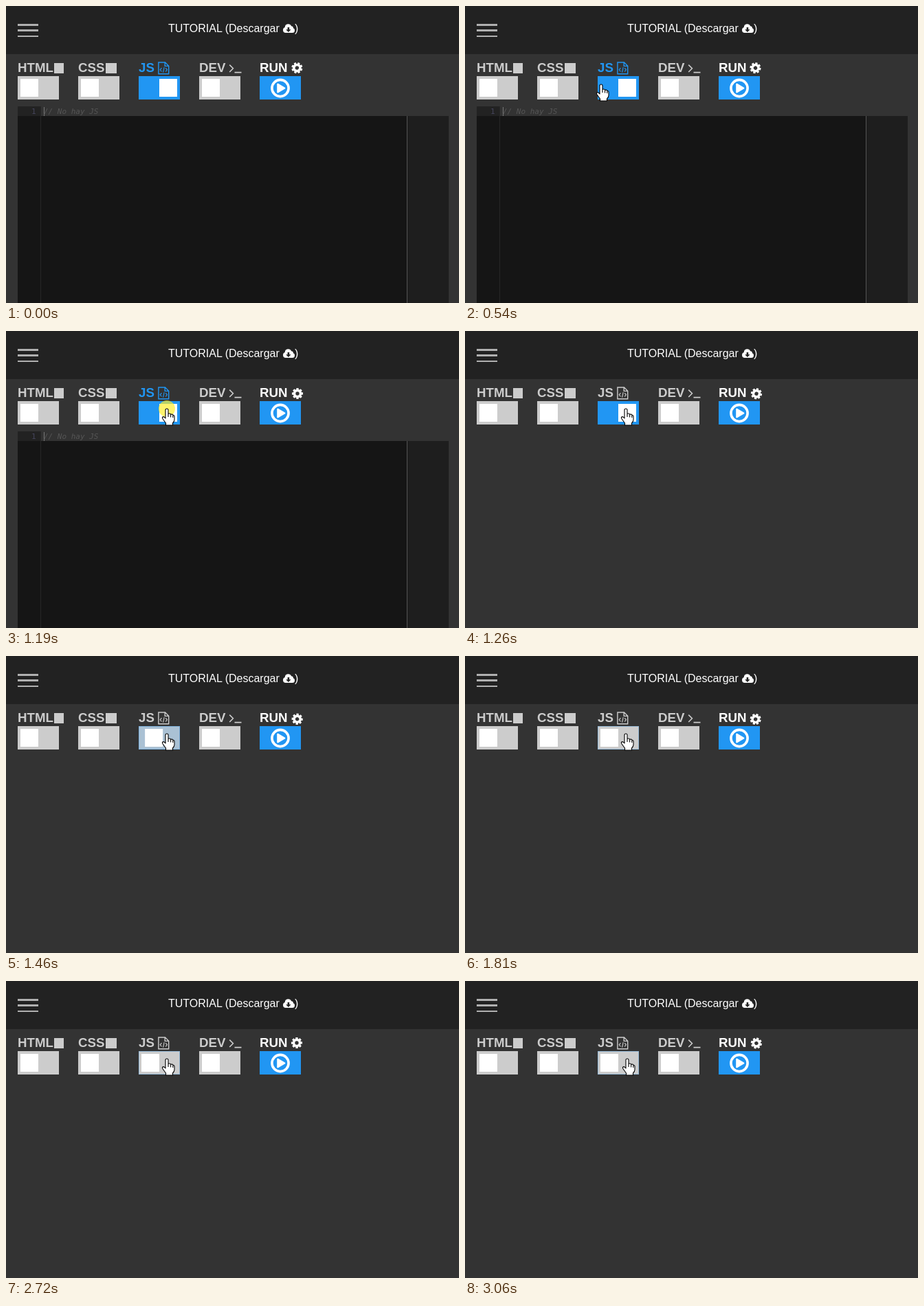
An HTML page with a canvas that plays this animation: 659x432 px, repeating every 3130 ms.

```html
<!DOCTYPE html>
<html lang="es">
<head>
<meta charset="utf-8">
<title>Editor</title>
<style>
html, body { margin: 0; width: 100%; height: 100%; overflow: hidden; background: #333; }
canvas { position: absolute; left: 0; top: 0; }
span { position: absolute; line-height: 1; white-space: pre; font-family: "Liberation Sans", Arial, sans-serif; }
.title { top: 25px; font-size: 16px; color: #fff; }
.label { top: 81px; font-size: 18.72px; font-weight: bold; color: #ccc; }
.code { top: 148px; font: italic 11px/11px "DejaVu Sans Mono", monospace; color: #555; }
</style>
</head>
<body>
<canvas id="stage" width="659" height="432"></canvas>
<span class="title" style="left:236px">TUTORIAL (Descargar</span>
<span class="title" style="left:420px">)</span>
<span class="label" style="left:17px">HTML</span>
<span class="label" style="left:105px">CSS</span>
<span class="label" id="js" style="left:193px">JS</span>
<span class="label" style="left:281px">DEV</span>
<span class="label" style="left:369px; color:#fff">RUN</span>
<div id="editor">
<span class="code" style="left:37px; font-style:normal; color:#45455c">1</span>
<span class="code" style="left:55px">// No hay JS</span>
</div>
<script>
const ctx = document.getElementById('stage').getContext('2d');
const jsLabel = document.getElementById('js');
const editor = document.getElementById('editor');
const LOOP = 3130, CLICK = 1260, BLUE = '#2196f3', GREY = '#cccccc';

// [time, step] pairs: the picture advances in steps of about 68 ms
const STEPS = [[0, 0], [540, 8], [1060, 16], [1600, 24], [2180, 32], [2720, 40], [3130, 46]];
// [step, x] of the pointer's fingertip
const PATH = [[6, 150], [7, 175], [8, 198], [10, 208], [13, 228], [15, 234], [42, 234], [44, 236]];

function along(points, p) {
  let i = 1;
  while (i < points.length - 1 && p > points[i][0]) i++;
  const [a, va] = points[i - 1], [b, vb] = points[i];
  return va + (vb - va) * Math.min(1, Math.max(0, (p - a) / (b - a)));
}

// cubic-bezier(.25, .1, .25, 1)
function ease(x) {
  if (x <= 0) return 0;
  if (x >= 1) return 1;
  const bez = (s, a, b) => 3 * s * (1 - s) * (1 - s) * a + 3 * s * s * (1 - s) * b + s * s * s;
  let lo = 0, hi = 1;
  for (let i = 0; i < 20; i++) {
    const mid = (lo + hi) / 2;
    if (bez(mid, .25, .25) < x) lo = mid; else hi = mid;
  }
  return bez(lo, .1, 1);
}

function mix(a, b, k) {
  const part = (c, i) => parseInt(c.slice(i, i + 2), 16);
  return 'rgb(' + [1, 3, 5].map(i => Math.round(part(a, i) + (part(b, i) - part(a, i)) * k)) + ')';
}

function rect(color, x, y, w, h) {
  ctx.fillStyle = color;
  ctx.fillRect(x, y, w, h);
}

function disc(color, x, y, r) {
  ctx.fillStyle = color;
  ctx.beginPath();
  ctx.arc(x, y, r, 0, 7);
  ctx.fill();
}

function line(color, width, d) {
  ctx.strokeStyle = color;
  ctx.lineWidth = width;
  ctx.stroke(new Path2D(d));
}

function shape(color, d) {
  ctx.fillStyle = color;
  ctx.fill(new Path2D(d));
}

function toggle(x, off) {
  rect(mix(BLUE, GREY, off), x, 102, 60, 34);
  rect('#fff', x + 30 - 26 * off, 106, 26, 26);
}

function header() {
  rect('#222', 0, 0, 659, 70);
  for (const y of [26, 34, 43]) rect('#b0b0b0', 17, y, 30, 3 - (y > 40));
  disc('#fff', 407, 35, 4);
  disc('#fff', 410.5, 31, 4.8);
  disc('#fff', 415, 32, 2.8);
  disc('#fff', 416.5, 35.6, 3.5);
  rect('#fff', 407, 33, 9.5, 6);
  shape('#222', 'M409.6 31h2.6v3.2h2.4l-3.7 3.8l-3.7-3.8h2.4z');
}

function icons(fileColor) {
  rect(GREY, 70, 83, 14, 15);
  rect(GREY, 145, 83, 16, 15);
  line(fileColor, 1.4, 'M221.9 82h9.6l5.2 5.2v11.6h-14.8zM231.2 82v5.4h5.4');
  line(fileColor, 1.1, 'M226.4 90.2l-2.2 2.6l2.2 2.6M232.2 90.2l2.2 2.6l-2.2 2.6M230.2 89.2l-1.6 7.4');
  line(GREY, 1.6, 'M325.2 85.6l5.2 5.2l-5.2 5.2M332.5 96.6h10');
}

function runButton() {
  rect(BLUE, 369, 102, 60, 34);
  ctx.strokeStyle = '#fff';
  ctx.lineWidth = 3.6;
  ctx.beginPath();
  ctx.arc(399, 119.5, 12.1, 0, 7);
  ctx.stroke();
  ctx.lineJoin = 'round';
  line('#fff', 2.4, 'M395.4 113.8v11.4l9.8-5.7z');
  shape('#fff', 'M395.4 113.8v11.4l9.8-5.7z');
  ctx.lineJoin = 'miter';
}

// the wheel sits one pixel off its pivot, so it wobbles as it spins
function gear(angle) {
  ctx.save();
  ctx.translate(423, 91);
  ctx.rotate(angle);
  ctx.translate(1, 0);
  ctx.beginPath();
  for (let i = 0; i < 8; i++) {
    const a = i * Math.PI / 4;
    for (const [r, da] of [[6.2, -.27], [8.2, -.2], [8.2, .2], [6.2, .27]])
      ctx.lineTo(r * Math.cos(a + da), r * Math.sin(a + da));
  }
  ctx.closePath();
  ctx.moveTo(2.7, 0);
  ctx.arc(0, 0, 2.7, 0, Math.PI * 2, true);
  ctx.fillStyle = '#fff';
  ctx.fill('evenodd');
  ctx.restore();
}

function editorPane() {
  rect('#151515', 17, 146, 566, 286);
  rect('#1e1e1e', 584, 146, 60, 286);
  rect('#555', 583, 146, 1, 286);
  rect('#333', 51, 146, 593, 14);
  rect('#222', 17, 146, 33, 14);
  rect('#262626', 50, 146, 1, 286);
  rect('#777', 55, 147, 1, 13);
}

function hand(x, y) {
  ctx.save();
  ctx.translate(x, y);
  ctx.lineJoin = 'round';
  const body = 'M-2 14V2Q-2 0 0 0Q2 0 2 2V7.3Q5 6.3 6 8.3Q8.6 7.6 9 9.5Q11 9.2 11 11.5V16'
    + 'Q11 18.5 8.5 21V24H-1.5V21L-6 14.8Q-7.5 11.8 -5 11.6Q-3.8 11.6 -2 14Z';
  shape('#fff', body);
  line('#000', 1.1, body + 'M2 7.3V12M5.6 8.3V12.5M8.8 9.6V13');
  ctx.restore();
}

function draw(t) {
  const step = Math.floor(along(STEPS, Math.min(t + 9, LOOP - 1)));
  const now = step * LOOP / 46;
  const open = step < 19;
  const off = ease((step - 19) / 6);

  rect('#333', 0, 0, 659, 432);
  header();
  icons(open ? BLUE : GREY);
  toggle(17, 1);
  toggle(105, 1);
  toggle(193, off);
  toggle(281, 1);
  if (off > 0) line('rgba(33,150,243,.3)', 1, 'M193.5 102.5h59v33h-59z');
  runButton();
  gear(step ? (now - 1225) / 1000 * Math.PI : -1.2);
  if (open) editorPane();
  if (step === 17 || step === 18) disc('rgba(255,238,40,.68)', 234, 113, 12);
  if (step >= 6) hand(along(PATH, step), step < 10 ? 114 : 113);

  jsLabel.style.color = open ? BLUE : GREY;
  editor.style.visibility = open ? 'visible' : 'hidden';
}

const start = performance.now();
function tick() {
  draw((performance.now() - start) % LOOP);
  requestAnimationFrame(tick);
}
tick();
</script>
</body>
</html>
```
